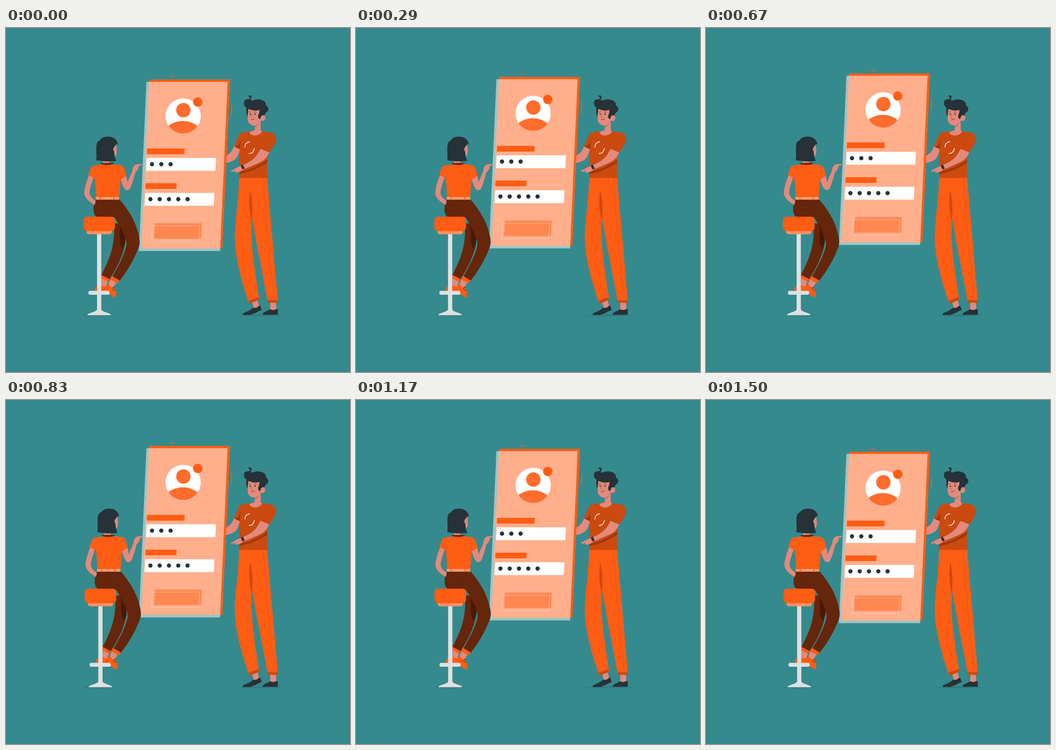
An HTML page with a canvas for the animation above (1.54 s loop, 748 by 748 pixels).

```html
<!DOCTYPE html>
<html lang="en">
<head>
<meta charset="utf-8">
<title>Login illustration</title>
<style>
html, body { margin: 0; width: 100%; height: 100%; overflow: hidden; background: #358a8e; }
canvas { display: block; width: 100vw; height: 100vh; }
</style>
</head>
<body>
<canvas id="stage" width="748" height="748"></canvas>
<script>
const ctx = document.getElementById('stage').getContext('2d');
const LOOP = 1540, STEP = 1000 / 24, CYCLE = 1500, UNIT = 1.496;
const C = {
  bg: '#358a8e', orange: '#ff5c14', soft: '#ff6c2b', rust: '#cb4a10', deepRust: '#a1390b',
  brown: '#66260b', deepBrown: '#471a06', dark: '#263238', skin: '#e4897b', shade: '#c96f63',
  peach: '#ff9160', grey: '#e0e0e0', white: '#ffffff'
};

function fill(color, d) {
  ctx.fillStyle = color;
  ctx.fill(new Path2D(d));
}
function line(color, width, d) {
  ctx.strokeStyle = color;
  ctx.lineWidth = width;
  ctx.lineCap = 'round';
  ctx.stroke(new Path2D(d));
}
function oval(color, x, y, rx, ry = rx) {
  ctx.fillStyle = color;
  ctx.beginPath();
  ctx.ellipse(x, y, rx, ry, 0, 0, 7);
  ctx.fill();
}
function box(color, x, y, w, h, r = 0) {
  ctx.fillStyle = color;
  ctx.beginPath();
  ctx.roundRect(x, y, w, h, r);
  ctx.fill();
}
// Parallelogram with its lower edge moved left by lean.
function slab(color, x, y, w, h, lean) {
  fill(color, `M${x},${y} h${w} l${-lean},${h} h${-w}Z`);
}

// Piecewise linear value over equally spaced stops.
function along(stops, p) {
  const s = p * (stops.length - 1), i = Math.floor(s);
  return stops[i] + (stops[i + 1] - stops[i]) * (s - i);
}
const floatY = p => 0.65 + UNIT * along([0, -10, 0], p);
const shakeX = p => 0.4 + UNIT * along([0, -1, 2, -4, 4, -4, 4, -4, 2, -1, 0], p);

function drawPhone() {
  slab(C.orange, 311, 112, 176.3, 367.5, 17);
  slab('rgba(255,255,255,.51)', 305.3, 117, 176.5, 368, 16.3);
  slab(C.orange, 357.3, 104.8, 10, 1.5, 0.5);
  slab(C.orange, 490, 167, 1.8, 24.5, 0.7);

  oval(C.white, 385.2, 191.3, 38.3);
  ctx.save();
  ctx.beginPath();
  ctx.arc(385.2, 191.3, 38.3, 0, 7);
  ctx.clip();
  oval(C.soft, 384.5, 243, 47, 41);
  ctx.restore();
  oval(C.soft, 385.7, 178.6, 15.6);
  oval(C.orange, 417, 161, 10.2);

  slab(C.orange, 306.6, 262, 82, 12.4, 0.6);
  slab(C.white, 305.8, 282.4, 150.8, 28, 1.3);
  slab(C.orange, 303.4, 337.6, 67.6, 12.4, 0.6);
  slab(C.white, 302.4, 358.4, 150.8, 28, 1.3);
  for (let i = 0; i < 3; i++) oval(C.dark, 317.5 + i * 20.2, 296.2, 4.6);
  for (let i = 0; i < 5; i++) oval(C.dark, 314 + i * 20.2, 372.2, 4.6);

  slab('#ff8751', 323.6, 424.5, 102, 33.8, 1.6);
  line('rgba(255,255,255,.55)', 0.8, 'M319,430 h102 l-2,33.5 h-101.5Z');
}

function drawWoman() {
  oval('rgba(0,0,0,.1)', 202, 624.6, 37, 1.8);

  // Shoes and ankles
  fill(C.skin, 'M208,542 L222,550 L217,563 L207,561Z');
  fill(C.orange, 'M193,571 C192,563 199,560 205,555 L210,561 L216,561 L215,572Z');
  fill(C.skin, 'M227,546 L240,554 L231,567 L221,561Z');
  fill(C.orange, 'M212,572 C212,564 217,561 223,557 L229,564 L235,562 C236,569 240,574 240,580 L238,586 C229,583 224,577 212,572Z');
  line(C.dark, 1, 'M231,566 L236,564 M232,569 L237,570');

  // Legs
  fill(C.brown, 'M234,425 L253,425 C262,445 261,470 253,491 C246,511 236,530 223,549 L207,538 C222,508 239,475 234,425Z');
  fill(C.deepBrown, 'M246,425 C250,445 244,465 253,480 L259,468 L260,440Z');
  fill(C.brown, 'M196,372 L246,372 C262,390 279,415 286,441 C291,459 293,469 286,483 C276,508 262,531 245,552 L230,543 C242,521 258,494 262,471 C261,451 248,430 235,411 L197,411 C187,404 189,384 196,372Z');
  line(C.deepBrown, 0.5, 'M204,375 C214,390 224,402 235,412');
  fill(C.orange, 'M208,537 L225,546 L222,552 L205,543Z');
  fill(C.orange, 'M230,539 L247,549 L243,555 L226,546Z');

  // Stool
  box(C.grey, 197.9, 446, 9.2, 172);
  fill(C.grey, 'M177,623 C184,618 198,617 198,611 H207 C207,617 221,618 228,623 Q229,624.5 226,624.5 H179 Q176,624.5 177,623Z');
  box(C.grey, 179, 571.6, 46.2, 8.4, 4);
  box(C.peach, 175, 436, 55, 12.4, 5);
  box(C.orange, 168.3, 410.3, 68.6, 31.4, 8);

  // Arms
  fill(C.skin, 'M181,318 C176,332 171,345 170,359 C171,369 181,379 193,384.5 L195,376 C187,371 182,365 181.5,358 C183,345 187,335 191,323Z');
  fill(C.skin, 'M249,328 C252,339 256,350 261,352 C267,354 270,350 272,344 C276,333 279,323 281,314 C285,311 288,307 289,299.5 L294,298.5 Q297,296.5 294,295.7 L284,296.3 C278,298 275,303 274.5,311 C271,320 267,327 264.5,336 L261,320Z');

  // Torso
  fill(C.orange, 'M179,319.5 C182,310 184,302 188,300 C193,298 200,298 206,297 L234,296.5 C243,297 251,298 254,300.5 C258,305 260,314 262,321 L249.5,329.5 L246,369 H196 C195,354 194,340 193,327 Z');
  box('#ff9e74', 195, 367.6, 51, 5.6);
  box(C.orange, 204, 366, 2, 8);
  box(C.orange, 233, 366, 2, 8);
  fill(C.skin, 'M211,286 H225 V296 H211Z');
  fill(C.brown, 'M204,294 Q219,293 235,293.5 Q232,297.5 220,297.8 Q208,298 204,294Z');

  // Head
  fill(C.skin, 'M238,251 C241,259 241,268 240.5,272 C240,278 236,279.5 233,277 L231,258Z');
  fill(C.dark, 'M196,287.5 C198,275 195,264 197,253 C198,248 200,246 204,244.5 C207,238 215,236 222,236.2 C234,236 242,243 243.3,254 L239.5,252 C238,257 233,259 233,265 C235,267 236,274 236,279 L239.5,289 C225,291 210,290 196,287.5Z');
  line(C.shade, 0.8, 'M236,260 Q239,263 236,269');
}

function drawMan() {
  oval('rgba(0,0,0,.1)', 550, 624.8, 50, 2);

  // Feet
  fill(C.skin, 'M535,595 L547,591 L551,607 L539,610Z');
  fill(C.skin, 'M575,596 H587 L588,614 H574Z');
  fill(C.dark, 'M515,621 C521,617 531,615 537,608 Q545,610 550,604 L553,604.5 L556,613 C548,616 540,622 530,624 H515Z');
  fill(C.dark, 'M558,622 C560,617 569,616 574,611.5 Q582,615 588,611 L591,612 L591,623.6 H558Z');

  // Trousers
  fill(C.orange, 'M507,324 H568 C572,380 579,450 583,500 C586,540 589,565 591,597 L569,596 C561,548 546,480 535,413 C530,470 543,535 550,587 L528,597 C514,555 497,500 497.5,455 C498,415 506,375 507,324Z');
  fill(C.rust, 'M531.5,352 C527,376 529,400 534,419 C538,398 535,374 531.5,352Z');
  line(C.rust, 0.6, 'M560,327 C564,400 572,500 584,591');
  fill(C.rust, 'M527,593 L549,585 L550.5,591 L530,599.5Z');
  fill(C.rust, 'M568,591.5 L591,592 L591.5,598 L568.5,597Z');

  // Far arm and torso
  fill(C.skin, 'M496,256 L509,262 C506,273 504,280 499,285 C493,290 485,293 474,294 V280 C487,275 493,266 496,256Z');
  fill(C.rust, 'M511,228 C517,226 524,225 530,224.5 H556 C563,225.5 569,226 575,227 C586,229 590,239 586,249 C582,258 577,264 572,272 L568,276 V326 H507 C507,305 506,284 508.5,263.5 L496,257.5 C501,246 505,232 511,228Z');
  fill(C.deepRust, 'M496,257.5 L508.5,263.5 L510,243 C508,252 504,258 496,257.5Z');
  fill(C.deepRust, 'M508,312 C530,309 549,299 568,286 V293 C552,303 536,312 507,318Z');
  line(C.white, 1.5, 'M519.5,259 Q520,249 530,247.3');
  line(C.white, 1.5, 'M528.5,273 Q538,273 540,262');

  // Near arm
  fill(C.skin, 'M554,262 L572.5,270 C568,282 560,289 550,293 C539,298 529,303 518,306.5 L512,299 C525,295 541,285 547,274Z');
  fill(C.rust, 'M553,262.5 L572,270.5 L574,262 L556,255Z');
  fill(C.skin, 'M514,299 C505,301 498,306 489.5,310.5 Q488,313.5 493,312.5 L500,310 L497,312.8 Q499,315 504,314 C510,313 515,310 518,305Z');
  fill(C.dark, 'M511,299 L515,297 L519,305 L515,307.5 Q511,304 511,299Z');

  // Head
  fill(C.skin, 'M529,226 C531,236 550,237 557,225 L554,223 L553.5,198 L541,206 V222Z');
  fill(C.skin, 'M525,174 L525.5,197 C525,207 533,212 541,212.5 C549,210 553,203 554,196 L552,174Z');
  fill(C.shade, 'M541,212.5 Q548,211 551,204 Q549,214 541,216Z');
  oval(C.skin, 557.5, 195.5, 6.2, 6.6);
  fill(C.dark, 'M525,193 C522,186 522,180 523,173 C517,170 516,162 519,157.5 C522,154 529,156 530.5,153 C531.5,150 528,151 527,147.5 C531,145 536,148 533.5,153 C531,157 533,158.5 538,157 C548,153 560,156 564,162 C566,165 564,168 566,169 C572,172 571,179 568,182 C563,184 564,188 561,190 C556,188 554,192 553,198 C549,198 547,193 549,188 C551,185 551,181 551,178 C542,181 534,179 527,176Z');
  oval(C.dark, 531, 187.3, 1.3, 1.7);
  oval(C.dark, 541.5, 187.3, 1.3, 1.7);
  line(C.dark, 0.9, 'M528.5,183 L532,182.2 M539.5,182.3 L544,183.3');
  line('#b85b50', 1, 'M535,187 L532.5,194 L535,194.5');
  line(C.dark, 1, 'M533.5,199 Q538,200 540.5,196.8');
  line(C.shade, 0.8, 'M556,195 Q558,191 560.5,193');
}

function shifted(x, y, draw) {
  ctx.save();
  ctx.translate(x, y);
  draw();
  ctx.restore();
}

function render(now) {
  const step = Math.floor(((now % LOOP) + 5) / STEP);
  const p = ((32 + step * STEP * 0.988) % CYCLE) / CYCLE;
  ctx.fillStyle = C.bg;
  ctx.fillRect(0, 0, 748, 748);
  drawMan();
  shifted(0, floatY(p), drawPhone);
  shifted(shakeX(p), 0, drawWoman);
}

const start = performance.now();
function tick() {
  render(performance.now() - start);
  requestAnimationFrame(tick);
}
tick();
</script>
</body>
</html>
```
